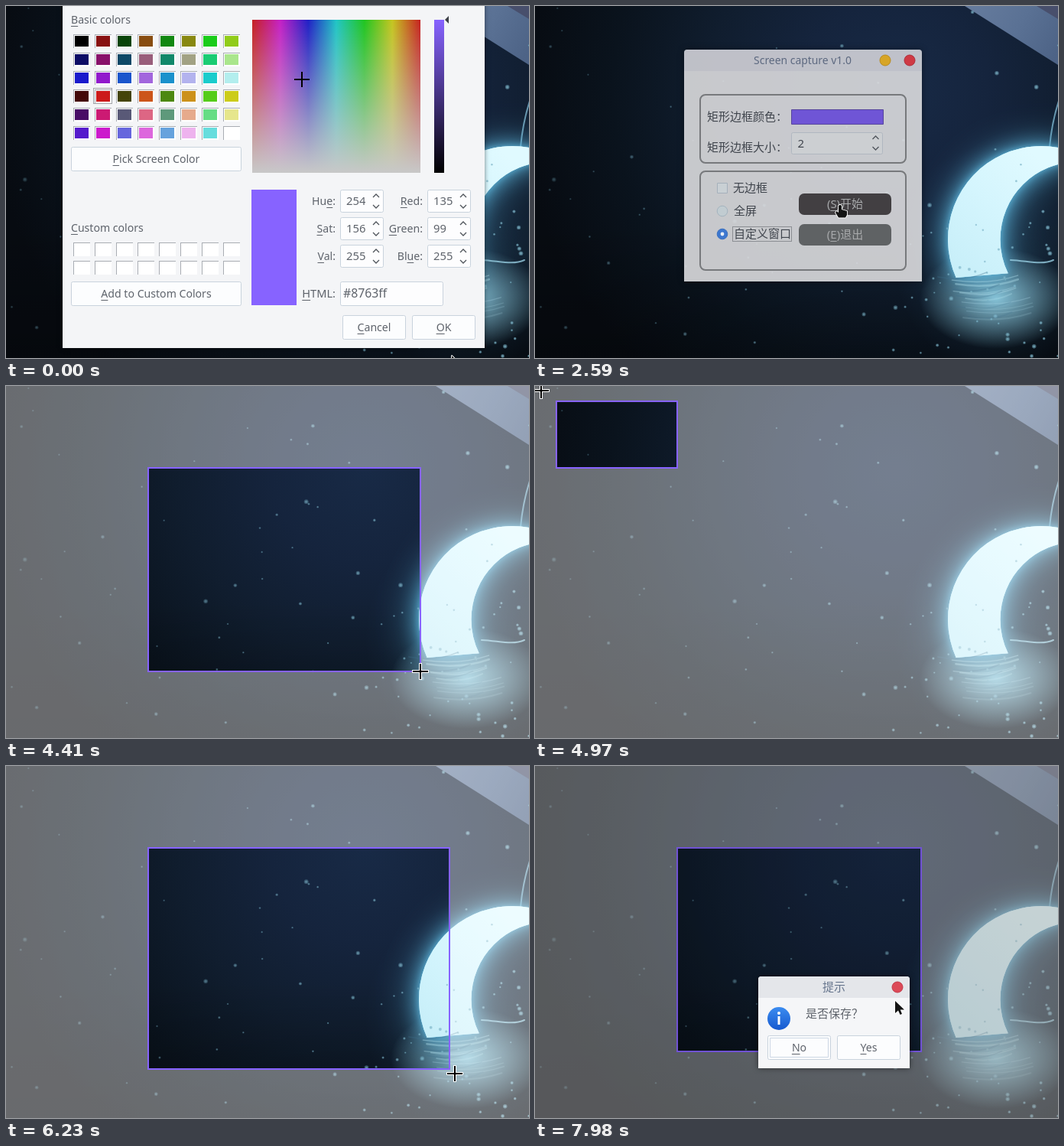
An HTML page with a canvas that plays this animation: 684 by 460 pixels, repeating every 8000 ms.

```html
<!DOCTYPE html>
<html lang="zh-CN">
<head>
<meta charset="utf-8">
<style>
html, body { margin: 0; width: 100%; height: 100%; overflow: hidden; background: #0a111a; }
canvas { display: block; }
</style>
</head>
<body>
<canvas id="stage" width="684" height="460"></canvas>
<script>
const W = 684, H = 460, LOOP = 8000, STEP = 70, TAU = Math.PI * 2;
const FONT = '"Noto Sans", "Noto Sans CJK SC", sans-serif';
const ACCENT = '#8763ff';
const stage = document.getElementById('stage').getContext('2d');
let g = stage;

const clamp = v => Math.max(0, Math.min(1, v));
const ramp = (t, start, length) => clamp((t - start) / length);
const ease = k => k + k * (1 - k) * (k - .5);

// ---------- drawing helpers ----------
function rect(x, y, w, h, fill, stroke, r = 0, line = 1) {
  g.beginPath();
  g.roundRect(x, y, w, h, r);
  if (fill) { g.fillStyle = fill; g.fill(); }
  if (stroke) { g.strokeStyle = stroke; g.lineWidth = line; g.stroke(); }
}

function disc(x, y, r, fill, stroke) {
  g.beginPath();
  g.arc(x, y, r, 0, TAU);
  g.fillStyle = fill;
  g.fill();
  if (stroke) { g.strokeStyle = stroke; g.lineWidth = 1; g.stroke(); }
}

// "&" marks the underlined letter; cy is the middle of the line.
function label(text, x, cy, color, align = 'left', size = 14.1) {
  const at = text.indexOf('&');
  const plain = text.replace('&', '');
  g.font = `${size}px ${FONT}`;
  g.fillStyle = color;
  const width = g.measureText(plain).width;
  const left = align === 'center' ? x - width / 2 : align === 'right' ? x - width : x;
  g.fillText(plain, left, cy + 5);
  if (at >= 0) {
    const before = g.measureText(plain.slice(0, at)).width;
    g.fillRect(left + before, Math.round(cy + 8), g.measureText(plain[at]).width, 1);
  }
}

function gradient(x0, y0, x1, y1, colors) {
  const fill = g.createLinearGradient(x0, y0, x1, y1);
  colors.forEach((c, i) => fill.addColorStop(i / (colors.length - 1), c));
  return fill;
}

function withAlpha(alpha, draw) {
  if (alpha <= 0) return;
  g.save();
  g.globalAlpha = alpha;
  draw();
  g.restore();
}

function shadowed(blur, color, draw) {
  g.save();
  g.shadowBlur = blur;
  g.shadowColor = color;
  draw();
  g.restore();
}

function dotted(x, y, w, h) {
  g.save();
  g.setLineDash([1, 1]);
  rect(x + .5, y + .5, w, h, null, '#50545a');
  g.restore();
}

function chevrons(x, cy) {
  g.strokeStyle = '#50555c';
  g.lineWidth = 1.3;
  for (const s of [-1, 1]) {
    g.beginPath();
    g.moveTo(x - 4, cy + s * 5);
    g.lineTo(x, cy + s * 9);
    g.lineTo(x + 4, cy + s * 5);
    g.stroke();
  }
}

// ---------- night sky ----------
function random(seed) {
  return () => (seed = (seed * 16807) % 2147483647) / 2147483647;
}

function glow(x, y, rx, ry, color, alpha) {
  g.save();
  g.translate(x, y);
  g.scale(rx, ry);
  const fill = g.createRadialGradient(0, 0, 0, 0, 0, 1);
  fill.addColorStop(0, `rgba(${color},${alpha})`);
  fill.addColorStop(.5, `rgba(${color},${alpha * .5})`);
  fill.addColorStop(1, `rgba(${color},0)`);
  g.fillStyle = fill;
  g.fillRect(-1, -1, 2, 2);
  g.restore();
}

function drawStars(rnd, count, left, top) {
  for (let i = 0; i < count; i++) {
    const x = left + rnd() * (W - left), y = top + rnd() * (H - top);
    const r = 1.2 + 1.8 * rnd() ** 2, a = .25 + x / 1100;
    disc(x, y, r, `rgba(112,168,190,${a * .6})`);
    disc(x, y, r * .6, `rgba(135,190,208,${a * .7})`);
  }
}

function drawMoon(rnd) {
  glow(600, 330, 130, 150, '60,120,160', .25);
  glow(603, 382, 100, 66, '135,195,215', 1);
  g.beginPath();
  g.arc(662, 305, 122, 2.72, 1.6 * Math.PI);
  g.arc(710, 305, 101.5, 1.5 * Math.PI, 2.69, true);
  g.closePath();
  g.fillStyle = gradient(540, 330, 660, 200, ['#c8eff9', '#d4f5fd', '#e0faff']);
  for (const blur of [48, 24, 8])
    shadowed(blur, 'rgba(92,180,218,.8)', () => g.fill());

  g.lineCap = 'round';
  for (let i = 0; i < 14; i++) {
    const y = 354 + i * 4 + rnd() * 4;
    const x = 524 + i * 2.5 + rnd() * 22;
    const w = 55 + rnd() * 50;
    g.strokeStyle = i % 3 ? `rgba(180,225,237,${.42 - i * .02})` : `rgba(60,110,138,${.35 - i * .015})`;
    g.lineWidth = 1 + rnd() * 1.5;
    g.beginPath();
    g.moveTo(x, y);
    g.quadraticCurveTo(x + w * .55, y + 7, x + w, y - 6);
    g.stroke();
  }
  g.strokeStyle = 'rgba(150,205,225,.8)';
  g.lineWidth = 2;
  g.beginPath();
  g.moveTo(622, 332);
  g.bezierCurveTo(645, 333, 662, 339, 678, 332);
  g.stroke();
}

function drawSky() {
  const rnd = random(77);
  const sky = g.createRadialGradient(470, 110, 0, 470, 110, 490);
  ['#182a46', '#15243d', '#101d2e', '#0a131d', '#070b11']
    .forEach((color, i) => sky.addColorStop(i / 4, color));
  g.fillStyle = sky;
  g.fillRect(0, 0, W, H);
  g.fillStyle = gradient(0, 280, 0, H, ['rgba(0,0,0,0)', 'rgba(0,0,0,.25)']);
  g.fillRect(0, 280, W, 180);

  g.beginPath();
  g.moveTo(562, 0); g.lineTo(W, 0); g.lineTo(W, 77);
  g.fillStyle = gradient(580, 0, 684, 60, ['#647a9c', '#5a7194', '#4d6386']);
  g.fill();
  g.beginPath();
  g.moveTo(656, 0); g.lineTo(W, 0); g.lineTo(W, 17);
  g.fillStyle = '#484f6c';
  g.fill();

  g.strokeStyle = 'rgba(125,180,205,.8)';
  g.lineWidth = 2;
  g.beginPath();
  g.moveTo(685, 124);
  g.quadraticCurveTo(676, 152, 673, 184);
  g.stroke();

  drawMoon(rnd);
  drawStars(rnd, 70, 0, 0);
  drawStars(rnd, 45, 510, 260);
}

const sky = document.createElement('canvas');
sky.width = W;
sky.height = H;
g = sky.getContext('2d');
drawSky();
g = stage;

// ---------- main window ----------
const INK = '#3f444c';
const onButton = (x, y, top) => x >= 345 && x <= 466 && y >= top && y <= top + 28;

function pushButton(text, y, hovered) {
  rect(345, y, 121, 28, hovered ? '#423f42' : '#5f6264', null, 7);
  label(text, 405.5, y + 14, '#a7a9ab', 'center', 15);
}

function titleButton(x, fill, edge, active) {
  disc(x, 71, 7, active ? fill : '#a4a6a8', active && edge);
}

function drawWindow(t, x, y) {
  const active = t >= 2240;
  const hovers = top => t > 1050 && onButton(x, y, top);
  shadowed(active ? 8 : 4, 'rgba(0,0,0,.5)', () => rect(195, 57, 311, 303, 'rgba(238,239,241,.83)', null, [4, 4, 0, 0]));
  rect(195, 57, 311, 28, active ? 'rgba(165,170,188,.28)' : 'rgba(150,155,172,.32)', null, [4, 4, 0, 0]);
  label('Screen capture v1.0', 350, 71, active ? '#5d6980' : '#81889c', 'center', 13.9);
  titleButton(458, '#d7a526', '#b98b1f', active);
  titleButton(490, '#cf3a45', '#ad2b38', active);

  rect(216, 116, 269, 89, null, '#77797c', 7, 2);
  rect(216, 216, 269, 129, null, '#77797c', 7, 2);
  label('矩形边框颜色：', 225, 145, INK, 'left', 15);
  label('矩形边框大小：', 225, 185, INK, 'left', 15);
  rect(335.5, 135.5, 120, 19, '#6f55d6', '#56459c');
  rect(335.5, 165.5, 119, 28, '#cccfd2', '#b0b7c0', 2);
  label('2', 343.5, 180, INK, 'left', 15);
  chevrons(445.5, 179);

  rect(238.5, 231.5, 13, 13, '#c9d0d4', '#a5b0bb');
  label('无边框', 259, 238, INK, 'left', 15);
  disc(245, 268, 6.8, '#c1ccd1', '#a3b3be');
  disc(245, 298, 6.8, active ? '#3d77cf' : '#c1ccd1', active || x < 341 ? '#3b70bd' : '#a3b3be');
  if (active) {
    disc(245, 298, 2.4, '#e9eff6');
    dotted(258, 288, 77, 19);
  }
  label('全屏', 260, 268, INK, 'left', 15);
  label('自定义窗口', 260, 298, INK, 'left', 15);
  pushButton('(&S)开始', 245, hovers(245));
  pushButton('(&E)退出', 285, hovers(285));
}

// ---------- colour dialog ----------
const TEXT = '#5e636b', EDGE = '#c9d3dd';

function dialogButton(text, x, y, w, h, focused) {
  rect(x + .5, y + .5, w - 1, h - 1, '#fcfdfe', EDGE, 2);
  if (focused) rect(x + 3.5, y + 3.5, w - 7, h - 7, null, '#cdd7e4');
  label(text, x + w / 2, y + h / 2, TEXT, 'center');
}

function well(x, y, color) {
  rect(x, y, 22, 18, '#fff');
  g.fillStyle = '#a9adb3';
  g.fillRect(x, y, 22, 1);
  g.fillRect(x, y, 1, 18);
  rect(x + 2, y + 2, 18, 14, color);
}

// Slightly muted form of a pure RGB colour.
function muted(rgb) {
  const hi = Math.max(...rgb) * .1, lo = Math.min(...rgb) * .2;
  return `rgb(${rgb.map(v => Math.round(v * .7 + hi + lo))})`;
}

function spinBox(name, value, right, cy) {
  label(name, right, cy, TEXT, 'right');
  rect(right + 6.5, cy - 14.5, 56, 29, '#fdfdfe', EDGE, 2);
  g.save();
  g.beginPath();
  g.rect(right + 8, cy - 14, 31, 28);
  g.clip();
  label(value, right + 14, cy, TEXT, 'left', 14.8);
  g.restore();
  chevrons(right + 53, cy);
}

function drawColorDialog(t) {
  const pressed = t >= 350;
  shadowed(6, 'rgba(0,0,0,.5)', () => rect(74, -10, 552, 457, '#f4f5f7'));
  label('&Basic colors', 85, 18, TEXT);
  for (let i = 0; i < 48; i++) {
    const rgb = [(i / 3 | 0) % 4 * 85, (i / 12 | 0) * 85, i % 3 * 127.5];
    well(88 + (i / 6 | 0) * 28, 37 + i % 6 * 24, muted(rgb));
  }
  if (!pressed) dotted(114, 107, 24, 20);
  dialogButton('&Pick Screen Color', 85, 184, 223, 32);
  label('&Custom colors', 85, 290, TEXT);
  for (let i = 0; i < 16; i++) well(88 + i % 8 * 28, 309 + (i / 8 | 0) * 24, '#fff');
  dialogButton('&Add to Custom Colors', 85, 360, 223, 32);

  const hues = Array.from({ length: 7 }, (_, i) => `hsl(${360 - i * 60} 72% 45%)`);
  rect(322, 18, 220, 200, gradient(322, 0, 542, 0, hues));
  rect(322, 18, 220, 200, gradient(0, 18, 0, 218, ['rgba(200,200,200,0)', 'rgb(200,200,200)']));
  rect(377, 95, 20, 2, '#000');
  rect(386, 86, 2, 20, '#000');
  rect(560, 18, 13, 200, gradient(0, 18, 0, 218, [ACCENT, '#000']));
  g.fillStyle = '#3c4046';
  g.beginPath();
  g.moveTo(574, 18); g.lineTo(579, 13); g.lineTo(579, 23);
  g.fill();

  rect(321, 240, 59, 151, ACCENT);
  [['Hu&e:', '254', '&Red:', '135'], ['&Sat:', '156', '&Green:', '99'], ['&Val:', '255', 'Bl&ue:', '255']]
    .forEach(([name, value, name2, value2], row) => {
      spinBox(name, value, 431, 255 + row * 36);
      spinBox(name2, value2, 545, 255 + row * 36);
    });
  label('&HTML:', 431, 376, TEXT, 'right', 14.6);
  rect(437.5, 360.5, 134, 31, '#fdfdfe', EDGE, 2);
  label(ACCENT, 441, 376, TEXT, 'left', 15.8);
  dialogButton('&Cancel', 440, 404, 83, 32);
  dialogButton('&OK', 531, 404, 83, 32, pressed);
}

// ---------- save prompt ----------
function drawPrompt() {
  shadowed(7, 'rgba(0,0,0,.55)', () => rect(292, 275, 198, 120, '#f5f6f8', null, [4, 4, 0, 0]));
  rect(292, 275, 198, 28, '#e4e6ea', null, [4, 4, 0, 0]);
  label('提示', 391, 289, '#66758d', 'center', 15);
  disc(474, 289, 7, '#dc4a58', '#c23848');
  disc(319, 330, 15, gradient(0, 315, 0, 345, ['#3b8cf0', '#1659cf']));
  disc(319, 323, 2, '#fff');
  rect(317.5, 327, 3, 11, '#fff');
  label('是否保存？', 354, 324, TEXT, 'left', 15);
  dialogButton('&No', 304, 352, 83, 32, true);
  dialogButton('&Yes', 395, 352, 83, 32);
}

// ---------- pointer ----------
// Each move: start, end, then the place reached; the pointer rests in between.
const moves = [
  [70, 210, 588, 421], [910, 1190, 443, 294], [1190, 1680, 325, 285], [1750, 1960, 290, 297],
  [2240, 2590, 399, 260], [2590, 3010, 408, 260], [3150, 3500, 194, 116],
  [3570, 4380, 542, 373], [4500, 4970, 8, 6], [4970, 5430, 441, 319], [5430, 5460, 439, 348],
  [5460, 5880, 130, 63], [5880, 6200, 580, 396], [6200, 6400, 642, 449], [6400, 6650, 531, 398],
  [6720, 7350, 505, 373], [7560, 7980, 471, 307]
];

function pointerAt(t) {
  let x = 583, y = 457;
  for (const [start, end, toX, toY] of moves) {
    const k = ease(ramp(t, start, end - start));
    x += (toX - x) * k;
    y += (toY - y) * k;
  }
  return [Math.round(x), Math.round(y)];
}

const ARROW = new Path2D('M0 0V16L4 12.5L6.5 18L9 17L6.7 11.5H12Z');
const HAND = new Path2D('M-2 1Q0 -1 2 1V6L9 8V13L7 16.5H-2L-6 10L-4.5 8L-2 10Z');
const CROSS = new Path2D('M-9 0H9M0 -9V9');

function drawPointer(kind, x, y) {
  g.save();
  g.translate(x, y);
  g.lineJoin = 'round';
  g.strokeStyle = '#fff';
  if (kind === CROSS) {
    g.lineCap = 'square';
    g.lineWidth = 4;
    g.stroke(kind);
    g.lineWidth = 2;
    g.strokeStyle = '#000';
    g.stroke(kind);
  } else {
    g.lineWidth = 1.8;
    g.stroke(kind);
    g.fillStyle = '#141414';
    g.fill(kind);
  }
  g.restore();
}

function pointerKind(t, x, y) {
  if (t >= 3220 && t < 7490) return CROSS;
  const pointing = t > 1050 && t < 3220 && (onButton(x, y, 245) || onButton(x, y, 285));
  return pointing ? HAND : ARROW;
}

// ---------- selection ----------
// The frame trails the pointer slightly.
function drawSelection(t) {
  const [px, py] = pointerAt(Math.min(t - 30, 7400));
  const x = Math.min(px, 186), y = Math.min(py, 107);
  const w = Math.abs(px - 186), h = Math.abs(py - 107);
  if (w && h) g.drawImage(sky, x, y, w, h, x, y, w, h);
  rect(x, y, w, h, null, ACCENT, 0, 2);
}

function render(t) {
  const [x, y] = pointerAt(t);
  g.drawImage(sky, 0, 0);
  withAlpha(1 - ramp(t, 3150, 210), () => drawWindow(t, x, y));
  withAlpha(1 - ramp(t, 840, 210), () => drawColorDialog(t));
  withAlpha(.395 * ramp(t, 3150, 350), () => rect(0, 0, W, H, '#fff'));
  if (t >= 3640) drawSelection(t);
  withAlpha(.17 * ramp(t, 7560, 350), () => rect(0, 0, W, H, '#000'));
  withAlpha(ramp(t, 7560, 210), drawPrompt);
  drawPointer(pointerKind(t, x, y), x, y);
}

function tick(now) {
  render(Math.floor(now % LOOP / STEP) * STEP);
  requestAnimationFrame(tick);
}
requestAnimationFrame(tick);
</script>
</body>
</html>
```
